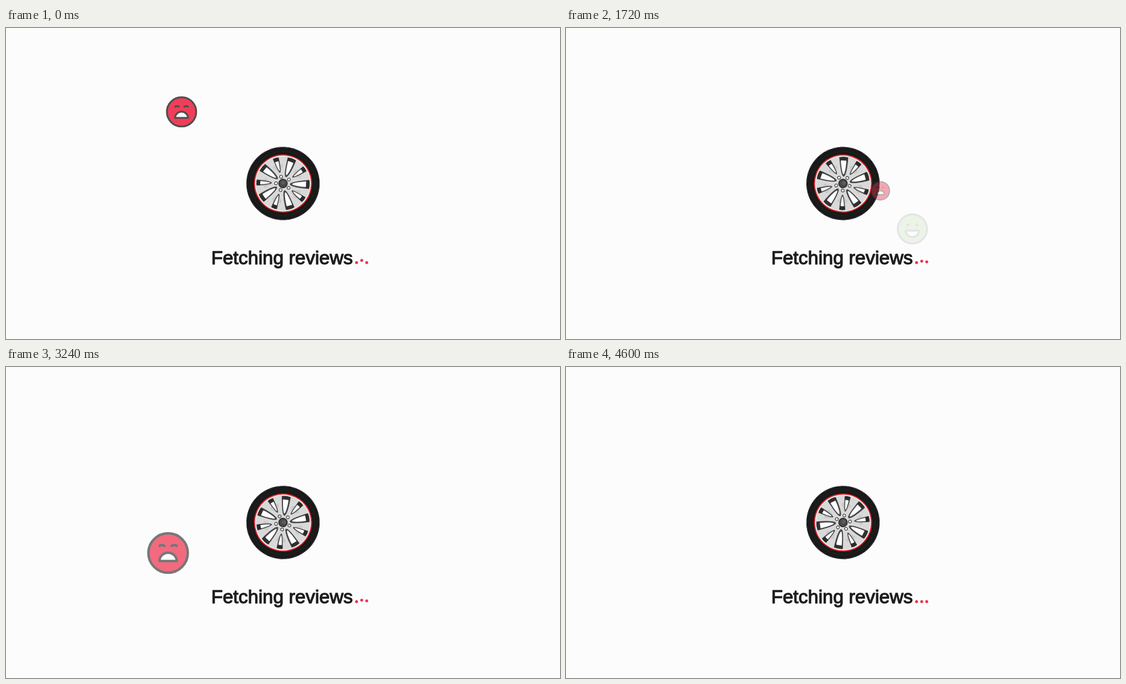
Animation of 998x561 px, one loop 4.64 s. Source, as an HTML page:

```html
<!DOCTYPE html>
<html lang="en">
<head>
<meta charset="utf-8">
<title>Fetching reviews</title>
<style>
  html, body { margin: 0; width: 100%; height: 100%; overflow: hidden; background: #fcfcfc; }
  svg { display: block; width: 998px; height: 561px; }
  text {
    font: 34px "Liberation Sans", Arial, sans-serif;
    fill: #1e1e1e; stroke: #1e1e1e; stroke-width: 1.3; stroke-linejoin: round;
  }
  .face { stroke: #484848; stroke-width: 4.4; stroke-linejoin: round; }
</style>
</head>
<body>
<svg viewBox="0 0 998 561">
  <defs>
    <g id="sad" class="face">
      <circle r="35.3" fill="#f03652"/>
      <path d="M-17-11.5Q-11-17-5-11.5M5-11.5Q11-17 17-11.5" fill="none"/>
      <path d="M-15.5 14.5A15.5 15 0 0 1 15.5 14.5Z" fill="#fff"/>
    </g>
    <g id="happy" class="face">
      <circle r="35.3" fill="#7cc45e"/>
      <g fill="#484848" stroke="none"><circle cx="-11" cy="-10" r="3.5"/><circle cx="11" cy="-10" r="3.5"/></g>
      <path d="M-16 4H16A16 15.5 0 0 1-16 4Z" fill="#fff"/>
    </g>
    <g id="segment">
      <path d="M-9-32L0-20 9-32 0-42Z" fill="#c9c9c9"/>
      <path d="M-5.5-47.3Q0-48.5 5.5-47.3C5-36 3-21 .5-20S-4-34-5.5-47.3Z" fill="#505050"/>
      <path d="M-5-47.3Q0-48.5 5-47.3L4-40H-4.2Z" fill="#2b2b2b"/>
      <path d="M-3-41H3C2.5-33 1.5-24 .4-23.5S-2.2-33-3-41Z" fill="#fff"/>
      <g transform="rotate(36)">
        <path d="M-8-47Q0-49 8-47C8-32 5-13 1-12.500S-6-28-8-47Z" fill="#484848"/>
        <path d="M-7.800-47Q0-49 7.800-47L6.500-40H-6.500Z" fill="#303030"/>
        <path d="M-5.200-41.500H4.800C4.800-31 2.500-17 .6-16.500S-3.800-28-5.200-41.500Z" fill="#fff"/>
      </g>
      <circle cy="-12.7" r="2.6" fill="#fff" stroke="#444" stroke-width="1.3"/>
    </g>
  </defs>

  <g id="wheel">
    <circle r="66" fill="#191919"/>
    <circle r="65.5" fill="none" stroke="#4a4a4a" stroke-width="1.2" pathLength="60" stroke-dasharray="1.2 .8"/>
    <circle r="58" fill="none" stroke="#222" stroke-width="1"/>
    <circle r="51.3" fill="#f4f4f4" stroke="#e0262c" stroke-width="2"/>
    <circle r="49" fill="#d9d9d9"/>
    <g id="segments"></g>
    <circle r="7.7" fill="#484848" stroke="#252525" stroke-width="1.4"/>
    <circle cx="-1" cy="-1" r="3.5" fill="#5c5c5c"/>
  </g>
  <text x="369.7" y="425.8">Fetching reviews</text>
  <g id="dots" fill="#f0314f"></g>
  <g id="faces"></g>
</svg>
<script>
const LOOP = 4640, STEP = 40, FADE = 200, FLIGHT = 743;
const CENTER = { x: 499, y: 280.5 };
const SPIN = 0.2405;                 // degrees per ms
const BOUNCE = 1520, LAST_PEAK = 3700;

// kind, start offset from the hub, start radius, moment of departure
const flights = [
  ["sad", -191, -135, 29.3, -93],
  ["happy", -239, 31, 32.9, 600],
  ["sad", 158, 31, 41, 1312],
  ["happy", 125, 82, 28, 1895],
  ["happy", -56, 85.5, 23.5, 2666],
  ["sad", -207, 55, 37.7, 3293],
  ["happy", -71, -199, 35, 4007],
];

const $ = id => document.getElementById(id);
const clamp = v => Math.min(1, Math.max(0, v));
const ease = p => p * p * (3 - 2 * p);

function add(parent, tag, attrs) {
  const el = document.createElementNS("http://www.w3.org/2000/svg", tag);
  for (const key in attrs) el.setAttribute(key, attrs[key]);
  return parent.appendChild(el);
}

for (let i = 0; i < 5; i++)
  add($("segments"), "use", { href: "#segment", transform: `rotate(${i * 72})` });
const dots = [631.5, 640.8, 649.8].map(cx => add($("dots"), "circle", { cx, r: 2.6 }));
const faces = flights.map(([kind]) => add($("faces"), "use", { href: "#" + kind }));

// Each dot hops in turn, one third of a cycle apart
function hop(i, t) {
  const first = (i - 1) * BOUNCE / 3;
  const peak = first + Math.round((t - first) / BOUNCE) * BOUNCE;
  const d = Math.abs(t - peak) / (BOUNCE / 3);
  return d < 1 && peak < LAST_PEAK ? Math.cos(d * Math.PI / 2) ** 2 : 0;
}

function draw(t) {
  $("wheel").setAttribute("transform",
    `translate(${CENTER.x} ${CENTER.y}) rotate(${56 + t * SPIN})`);
  dots.forEach((dot, i) => dot.setAttribute("cy", 423.2 - 4 * hop(i, t)));
  flights.forEach(([, dx, dy, radius, start], i) => {
    const left = 1 - ease(clamp((t - start) / FLIGHT));
    faces[i].setAttribute("opacity", clamp((t - start + FADE) / FADE) * left);
    faces[i].setAttribute("transform",
      `translate(${CENTER.x + dx * left} ${CENTER.y + dy * left}) scale(${radius / 37.5 * left})`);
  });
}

function tick() {
  draw(Math.floor(performance.now() % LOOP / STEP) * STEP);
  requestAnimationFrame(tick);
}
tick();
</script>
</body>
</html>
```
